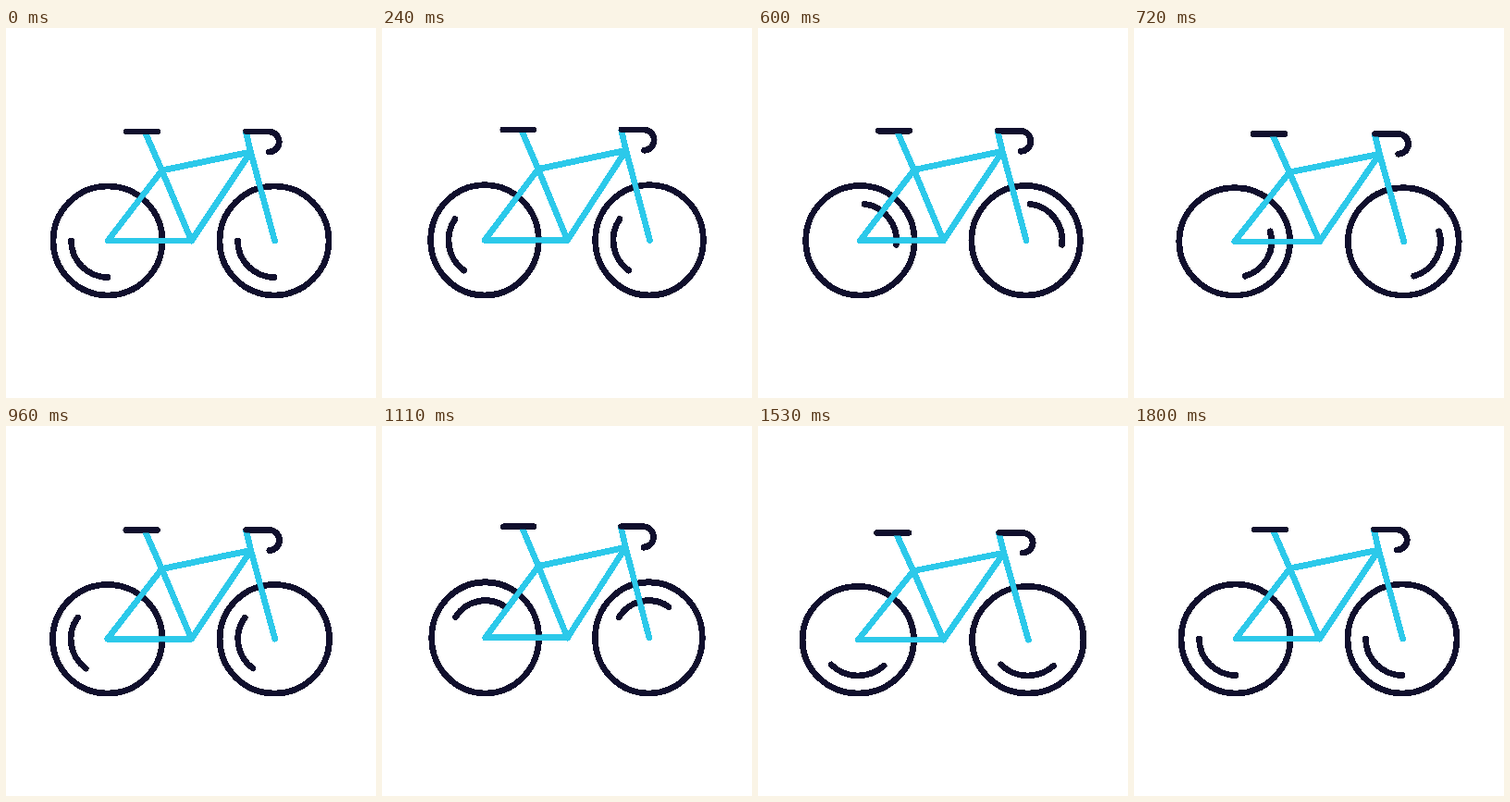
Write an HTML page that moves like this. It is 400x400 px and loops after 1.86 s.

```html
<!DOCTYPE html>
<html lang="en">
<head>
<meta charset="utf-8">
<title>Bicycle</title>
<style>
  html, body { margin: 0; width: 100%; height: 100%; overflow: hidden; background: #fff; }
  svg { display: block; width: 100%; height: 100%; }
  g { fill: none; stroke-width: 6; stroke-linecap: round; stroke-linejoin: round; }
  .dark { stroke: #100f2d; }
  .blue { stroke: #2cc9ea; }
</style>
</head>
<body>
<svg viewBox="0 0 400 400">
  <!-- Turns soft edge pixels solid -->
  <filter id="hard" filterUnits="userSpaceOnUse" x="0" y="0" width="400" height="400"
          color-interpolation-filters="sRGB">
    <feComponentTransfer><feFuncA type="linear" slope="20" intercept="-2"/></feComponentTransfer>
  </filter>
  <g filter="url(#hard)">
    <g id="bike">
      <g class="dark">
        <circle cx="110" cy="230" r="59"/>
        <circle cx="290" cy="230" r="59"/>
        <path class="shine" data-x="110" d="M-39.5 0A39.5 39.5 0 0 0 0 39.5"/>
        <path class="shine" data-x="290" d="M-39.5 0A39.5 39.5 0 0 0 0 39.5"/>
      </g>
      <g class="blue">
        <path d="M150.5 113L168.5 154L200.5 230H110L168.5 154L264.5 134L200.5 230"/>
        <path d="M259.5 113L264.5 134L290.5 230"/>
      </g>
      <g class="dark">
        <path d="M130 112H163.5"/>
        <path d="M259.5 112H284A11 11 0 0 1 284.5 134"/>
      </g>
    </g>
  </g>
</svg>
<script>
  const LOOP = 1860, TRAVEL = 1800, STEP = 30;
  const GROUND = 290, MIDDLE = 200;

  // [time in ms, vertical stretch]
  const BOUNCE = [[0, 0], [450, 0.02], [803, -0.02], [1156, 0.02], [1510, -0.02], [1800, 0]];

  const bike = document.getElementById('bike');
  const shines = document.querySelectorAll('.shine');
  const smooth = x => x * x * (3 - 2 * x);

  function stretchAt(t) {
    const i = Math.max(1, BOUNCE.findIndex(([time]) => time >= t));
    const [t0, v0] = BOUNCE[i - 1], [t1, v1] = BOUNCE[i];
    return v0 + (v1 - v0) * smooth((t - t0) / (t1 - t0));
  }

  function draw(ms) {
    const t = Math.min(TRAVEL, Math.floor((ms % LOOP) / STEP) * STEP);
    const s = stretchAt(t);
    const turn = 720 * smooth(t / TRAVEL);
    bike.setAttribute('transform',
      `translate(${MIDDLE} ${GROUND}) scale(${1 - s} ${1 + s}) translate(${-MIDDLE} ${-GROUND})`);
    for (const shine of shines) {
      shine.setAttribute('transform', `translate(${shine.dataset.x} 230) rotate(${turn})`);
    }
  }

  const start = performance.now();
  function tick() {
    draw(performance.now() - start);
    requestAnimationFrame(tick);
  }
  tick();
</script>
</body>
</html>
```
